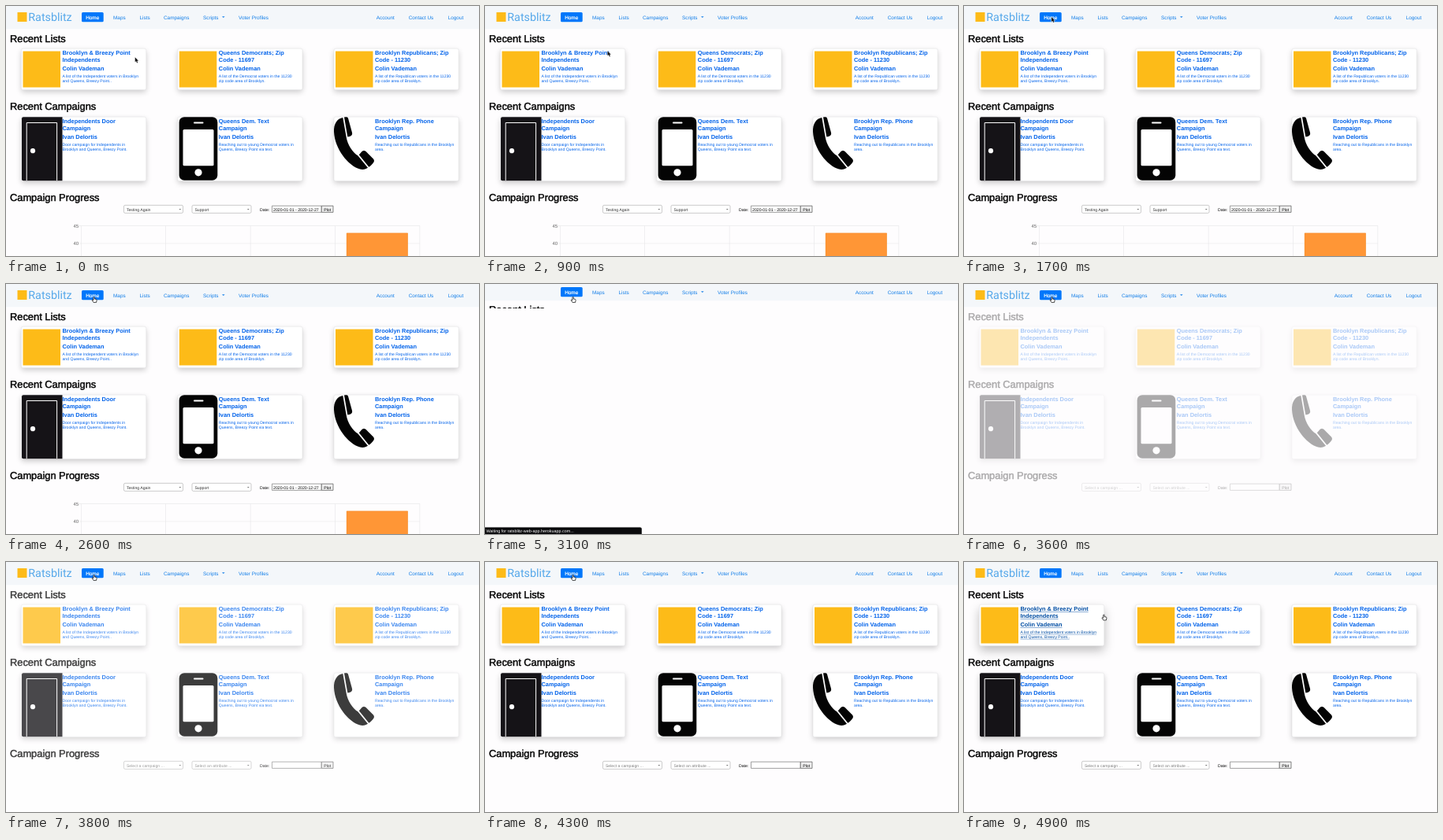
These frames come from a looping animation (600 by 318 pixels, 5000 ms). An HTML page with a canvas:

```html
<!DOCTYPE html>
<html lang="en">
<head>
<meta charset="utf-8">
<title>Campaign dashboard</title>
<style>
html, body { margin: 0; width: 100%; height: 100%; overflow: hidden; background: #fefdfe; }
canvas { display: block; width: 600px; height: 318px; }
</style>
</head>
<body>
<canvas id="stage"></canvas>
<script>
const W = 600, H = 318, LOOP = 5000, STEP = 100;
const PAPER = '#fefdfe', BLUE = '#0077fa', LINK = '#0062ea', NAVLINK = '#127ee8';
const AMBER = '#fdbb18', INK = '#040404';
const canvas = document.getElementById('stage');
const ratio = window.devicePixelRatio || 1;
canvas.width = W * ratio;
canvas.height = H * ratio;
const ctx = canvas.getContext('2d');
ctx.scale(ratio, ratio);
if ('textRendering' in ctx) ctx.textRendering = 'geometricPrecision';

const AUTHOR = 'Colin Vademan', MANAGER = 'Ivan Delortis';
const COLUMNS = [19.5, 217.8, 416];
const LISTS = [
  ['Brooklyn & Breezy Point', 'Independents', AUTHOR,
    'A list of the Independent voters in Brooklyn', 'and Queens, Breezy Point..'],
  ['Queens Democrats; Zip', 'Code - 11697', AUTHOR,
    'A list of the Democrat voters in the 11230', 'zip code area of Brooklyn.'],
  ['Brooklyn Republicans; Zip', 'Code - 11230', AUTHOR,
    'A list of the Republican voters in the 11230', 'zip code area of Brooklyn.']
];
const CAMPAIGNS = [
  ['Independents Door', 'Campaign', MANAGER,
    'Door campaign for Independents in', 'Brooklyn and Queens, Breezy Point.'],
  ['Queens Dem. Text', 'Campaign', MANAGER,
    'Reaching out to young Democrat voters in', 'Queens, Breezy Point via text.'],
  ['Brooklyn Rep. Phone', 'Campaign', MANAGER,
    'Reaching out to Republicans in the Brooklyn', 'area.']
];
const NAV = [['Maps', 136], ['Lists', 169.5], ['Campaigns', 200], ['Scripts', 250],
  ['Voter Profiles', 295], ['Account', 469.7], ['Contact Us', 510.7], ['Logout', 560.7]];

function text(str, x, y, size, color, weight = 'normal', family = '"Liberation Sans", Arial, sans-serif') {
  ctx.font = `${weight} ${size}px ${family}`;
  ctx.fillStyle = color;
  ctx.fillText(str, x, y);
}

// Regular glyphs with a hairline outline read as a medium weight.
function mediumText(str, x, y, size, color) {
  text(str, x, y, size, color);
  ctx.strokeStyle = color;
  ctx.lineWidth = size * 0.035;
  ctx.lineJoin = 'round';
  ctx.strokeText(str, x, y);
}

const heading = (str, y) => mediumText(str, 5, y, 12.85, INK);

function rect(x, y, w, h, color) {
  ctx.fillStyle = color;
  ctx.fillRect(x, y, w, h);
}

function box(x, y, w, h, r, fill, stroke, line = 0.6) {
  ctx.beginPath();
  ctx.roundRect(x, y, w, h, r);
  if (fill) { ctx.fillStyle = fill; ctx.fill(); }
  if (stroke) { ctx.strokeStyle = stroke; ctx.lineWidth = line; ctx.stroke(); }
}

function dot(x, y, r, color) {
  ctx.beginPath();
  ctx.arc(x, y, r, 0, Math.PI * 2);
  ctx.fillStyle = color;
  ctx.fill();
}

function caret(x, y, w, color) {
  ctx.beginPath();
  ctx.moveTo(x - w / 2, y);
  ctx.lineTo(x + w / 2, y);
  ctx.lineTo(x, y + w / 2);
  ctx.fillStyle = color;
  ctx.fill();
}

function navbar(height, complete) {
  rect(0, 0, W, height, '#f4f7fa');
  const mid = complete ? 14 : 10, base = mid + 2.6;
  if (complete) {
    rect(14.5, 8, 12, 12, AMBER);
    text('Ratsblitz', 28.3, 18.8, 14.3, '#56a8ea', 'normal', 'Roboto, sans-serif');
  }
  box(96, mid - 6, 27.7, 12.2, 1.5, BLUE);
  mediumText('Home', 101.2, base, 6.4, '#fff');
  for (const [label, x] of NAV) text(label, x, base, 6.4, NAVLINK);
  caret(275.8, mid - 0.8, 3.6, NAVLINK);
}

function card(x, y, h, lines, lifted) {
  ctx.save();
  ctx.shadowColor = lifted ? 'rgba(0,0,0,.26)' : 'rgba(0,0,0,.2)';
  ctx.shadowBlur = (lifted ? 13 : 7) * ratio;
  ctx.shadowOffsetY = (lifted ? 6 : 3) * ratio;
  box(x, y, 158.2, h, 2, '#fff');
  ctx.restore();
  box(x, y, 158.2, h, 2, '#fff', '#dcdddf', 0.5);

  const color = lifted ? '#004da3' : LINK, left = x + 52;
  const offsets = [8, 17, 28.1, 36.9, 42.9];
  lines.forEach((line, i) => {
    const base = y + offsets[i], small = i > 2;
    text(line, left, base, small ? 5.1 : 7.4, color, small ? 'normal' : 'bold');
    if (lifted) rect(left, base + 0.8, ctx.measureText(line).width, small ? 0.35 : 0.45, color);
  });
}

function door() {
  box(20, 141.2, 51.5, 81, [2, 0, 0, 2], '#151317');
  ctx.beginPath();
  ctx.moveTo(26.2, 222);
  ctx.lineTo(26.2, 148.5);
  ctx.lineTo(64.6, 148.5);
  ctx.lineTo(64.6, 222);
  ctx.strokeStyle = '#fff';
  ctx.lineWidth = 1;
  ctx.stroke();
  dot(34, 184.2, 3.1, '#fff');
}

function mobile() {
  box(219.6, 141.2, 48.7, 80.5, 6.5, INK);
  box(224.5, 157, 39, 46.3, 1.5, '#fff');
  box(238, 147.6, 12.5, 1.8, 0.9, '#fff');
  dot(244, 211.8, 4.6, '#fff');
}

// Curved body, then the ear and mouth pieces set off by thin gaps.
const HANDSET = new Path2D(`M427.3 142C420 143 415.6 150 416 160C417 182 434 203 449 207.6
  C453 208.6 457 207.5 459 205.8L446.5 190.5C440 187 433 176 431.8 167.3Z
  M429 141.6C431 141 433.4 141 434 142.7L439 161C439.6 163.5 438.5 165 436.5 165.8L433.3 166.6Z
  M447.8 189.3L451.5 185C453 183.5 455 183.8 456.3 184.8L466 194.5
  C467.3 196 467.2 197.5 466.2 199C464.5 201.5 462.5 203.5 460.3 204.8Z`);

function select(x, label, color) {
  box(x, 253.4, 75, 10, 1.6, '#fff', '#aaa');
  text(label, x + 3.4, 260.5, 5.15, color);
  caret(x + 71.3, 257.9, 2.8, '#666');
}

function controls(filled) {
  const color = filled ? '#333' : '#808080';
  select(149.5, filled ? 'Testing Again' : 'Select a campaign ...', color);
  select(236, filled ? 'Support' : 'Select an attribute ...', color);
  text('Date:', 322, 260.5, 5.15, INK);
  box(337.5, 254.2, 62.6, 8.2, 0, '#fff', '#777', 0.7);
  if (filled) text('2020-01-01 - 2020-12-27', 339, 260.5, 5.2, INK);
  box(400.3, 254.2, 14.7, 8.2, 0, '#efefef', '#555', 0.7);
  text('Plot', 403.2, 260.5, 5.15, INK);
}

function chart() {
  [['45', 279.5], ['40', 302]].forEach(([label, y]) => {
    text(label, 85.4, y + 2.2, 6, '#666');
    rect(92, y - 0.3, 433, 0.6, '#e6e6e8');
  });
  for (let i = 0; i < 5; i++) rect(95 + i * 107.4, 279.5, 0.6, H, '#e6e6e8');
  rect(432, 288.8, 77.7, 30, '#ff9636');
  ctx.strokeStyle = '#f08a2c';
  ctx.lineWidth = 0.5;
  ctx.strokeRect(432.2, 289, 77.3, 40);
}

function content(filled, hovered) {
  heading('Recent Lists', 45.6);
  LISTS.forEach((lines, i) => {
    card(COLUMNS[i], 54.2, 52.4, lines, hovered && i === 0);
    rect(COLUMNS[i] + 2, 57.5, 47.5, 46, AMBER);
  });
  heading('Recent Campaigns', 132.4);
  CAMPAIGNS.forEach((lines, i) => card(COLUMNS[i], 141.1, 81.4, lines));
  door();
  mobile();
  ctx.fillStyle = INK;
  ctx.fill(HANDSET);
  heading('Campaign Progress', 248.2);
  controls(filled);
  if (filled) chart();
}

function statusBar() {
  box(-2, 309.5, 200.8, 12, [0, 2, 0, 0], '#0b0b0d');
  text('Waiting for ratsblitz-web-app.herokuapp.com...', 1.4, 315.6, 5.4, '#fff');
}

const ARROW = new Path2D('M0 0V6L1.4 4.8L2.4 7.1L3.4 6.7L2.5 4.5L4.3 4.4Z');
const HAND = new Path2D(`M-.7 .2Q0-.5 .7 .2V2.4L2.8 2.8Q3.6 3 3.5 4L3 6.8H-.6
  L-2.3 4.3Q-2.5 3.3-1.5 3.5L-.7 4.2Z`);

function pointer(x, y, isHand) {
  ctx.save();
  ctx.translate(x, y);
  ctx.lineJoin = 'round';
  ctx.lineWidth = isHand ? 0.75 : 1;
  ctx.strokeStyle = isHand ? '#111' : '#fff';
  ctx.fillStyle = isHand ? '#fff' : '#111';
  if (isHand) ctx.fill(HAND);
  ctx.stroke(isHand ? HAND : ARROW);
  if (!isHand) ctx.fill(ARROW);
  ctx.restore();
}

const clamp = v => Math.min(1, Math.max(0, v));
const ease = v => v * v * (3 - 2 * v);
const mix = (a, b, k) => a + (b - a) * k;

function pointerAt(t) {
  if (t < 1900) {
    const k = ease(clamp((t - 700) / 800));
    return [mix(163.7, 111, k), mix(65.3, 14, k), false];
  }
  const k = ease(clamp((t - 4400) / 500));
  return [mix(111.6, 177.4, k), mix(16.6, 67.2, k), true];
}

function draw(t) {
  rect(0, 0, W, H, PAPER);
  const [x, y, isHand] = pointerAt(t);
  const reloading = t >= 3100 && t < 3500;
  if (reloading) {
    ctx.save();
    ctx.beginPath();
    ctx.rect(0, 0, W, 31);
    ctx.clip();
    heading('Recent Lists', 37);
    ctx.restore();
    navbar(21.3, false);
  } else {
    const fresh = t >= 3500;
    const alpha = fresh ? clamp((t - 3450) / 450) : 1;
    content(!fresh, fresh && y > 54);
    if (alpha < 1) {
      ctx.globalAlpha = 1 - alpha;
      rect(0, 0, W, H, PAPER);
      ctx.globalAlpha = 1;
    }
    navbar(29.3, true);
  }
  if (t >= 2700 && t < 3500) statusBar();
  pointer(x, y, isHand);
}

const start = performance.now();
function tick() {
  const t = (performance.now() - start) % LOOP;
  draw(Math.floor(t / STEP) * STEP);
  requestAnimationFrame(tick);
}
tick();
</script>
</body>
</html>
```
